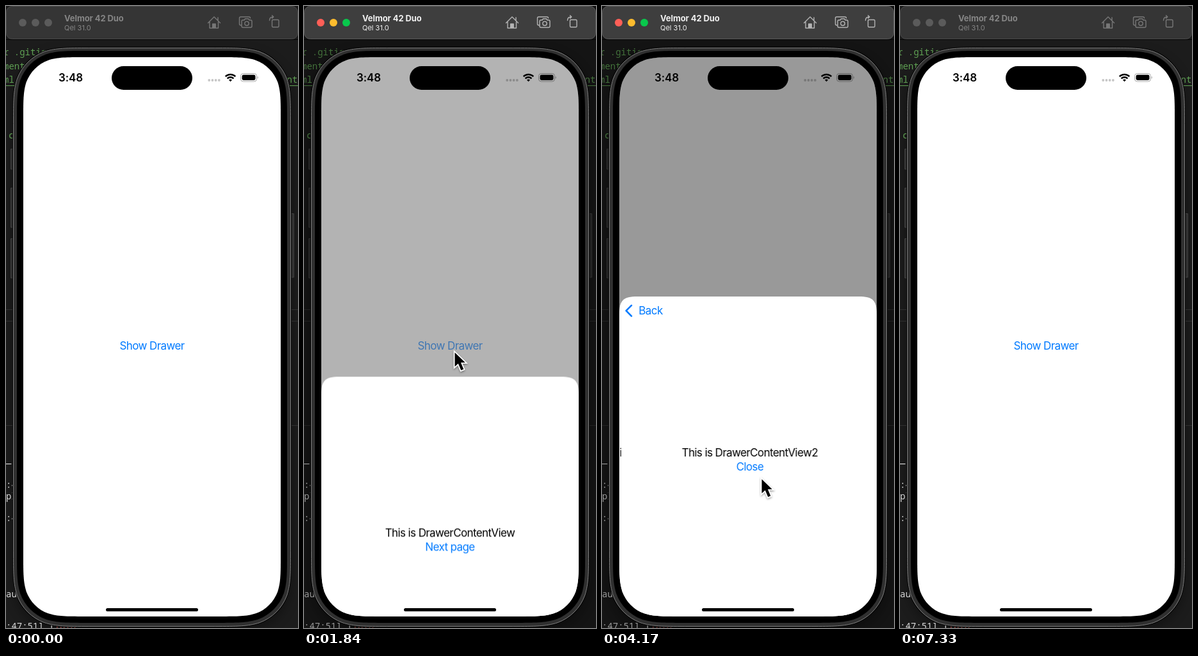
Write an HTML page that moves like this. It is 456 by 972 pixels and loops after 7.37 s.

```html
<!DOCTYPE html>
<html lang="en">
<head>
<meta charset="utf-8">
<title>Drawer demo</title>
<style>
html, body { margin: 0; width: 100%; height: 100%; overflow: hidden; background: #1c1c1c; }
svg { display: block; width: 456px; height: 972px; }
text { font-family: Inter, Roboto, sans-serif; }
.code text { font: 14px "Noto Sans Mono", "DejaVu Sans Mono", monospace; white-space: pre; }
.green { fill: #5fa053; }
.log { fill: #dadada; }
.ui { font-size: 17px; letter-spacing: -.6px; text-anchor: middle; }
.link { fill: #007aff; }
.icon { fill: none; stroke: currentColor; stroke-width: 1.4; stroke-linejoin: round; stroke-linecap: round; }

.anim { animation: 7.37s linear infinite; }
.active { animation-name: active; animation-timing-function: step-end; }
.idle { animation-name: idle; animation-timing-function: step-end; }
.drawer { animation-name: drawer; }
.dim { animation-name: dim; }
.tapShow { animation-name: tapShow; }
.tapNext { animation-name: tapNext; }
.tapClose { animation-name: tapClose; }
.page1 { animation-name: page1; }
.page2 { animation-name: page2; }
.back { animation-name: back; }
.cursor { animation-name: cursor; }

@keyframes active { 0%, 99.457% { opacity: 0 } 15.197% { opacity: 1 } 100% { opacity: 0 } }
@keyframes idle { 0%, 99.457% { opacity: 1 } 15.197% { opacity: 0 } 100% { opacity: 1 } }
@keyframes drawer {
  0% { transform: translateY(500px) }
  22.32% { transform: translateY(500px); animation-timing-function: ease-in-out }
  26.391% { transform: none }
  68.548% { transform: none; animation-timing-function: ease-in-out }
  72.619%, 100% { transform: translateY(500px) }
}
@keyframes dim {
  0% { opacity: 0 }
  22.32% { opacity: 0; animation-timing-function: ease-in-out }
  26.391% { opacity: .4 }
  68.548% { opacity: .4; animation-timing-function: ease-in-out }
  72.619%, 100% { opacity: 0 }
}
@keyframes tapShow { 0%, 22.319% { opacity: 1 } 22.32% { opacity: .2 } 27%, 100% { opacity: 1 } }
@keyframes tapNext { 0%, 51.22% { opacity: 1 } 51.221% { opacity: .2 } 56%, 100% { opacity: 1 } }
@keyframes tapClose { 0%, 68.547% { opacity: 1 } 68.548% { opacity: .2 } 73.2%, 100% { opacity: 1 } }
/* critically damped spring push */
@keyframes page1 {
  0% { transform: none }
  51.221% {
    transform: none;
    animation-timing-function: linear(0, .102 5%, .294 10%, .481 15%, .637 20%, .834 30%, .929 40%, .971 50%, .993 66%, 1);
  }
  59.362%, 73.3% { transform: translateX(-120px) }
  73.301%, 100% { transform: none }
}
@keyframes page2 {
  0% { transform: translateX(402px) }
  51.221% {
    transform: translateX(402px);
    animation-timing-function: linear(0, .102 5%, .294 10%, .481 15%, .637 20%, .834 30%, .929 40%, .971 50%, .993 66%, 1);
  }
  59.362%, 73.3% { transform: none }
  73.301%, 100% { transform: translateX(402px) }
}
@keyframes back { 0%, 51.8% { opacity: 0 } 55.5%, 73.3% { opacity: 1 } 73.301%, 100% { opacity: 0 } }
@keyframes cursor {
  0%, 2% { transform: translate(23px, 976px) }
  4.1% { transform: translate(62px, 832px) }
  6.8% { transform: translate(158px, 632px) }
  9.5% { transform: translate(217px, 547px) }
  11.669%, 16.5% { transform: translate(227px, 534px) }
  21%, 30.1% { transform: translate(234px, 538px) }
  31.8% { transform: translate(244px, 502px) }
  33.4% { transform: translate(238px, 452px) }
  35.007%, 40.6% { transform: translate(226px, 433px) }
  42.5% { transform: translate(236px, 585px) }
  44.6% { transform: translate(243px, 790px) }
  46.2% { transform: translate(244px, 752px) }
  47.762%, 52% { transform: translate(244px, 727px) }
  56%, 57% { transform: translate(248px, 736px) }
  61.2% { transform: translate(246px, 728px) }
  63.5%, 75.4% { transform: translate(240px, 725px) }
  76.5% { transform: translate(186px, 758px) }
  78.4%, 100% { transform: translate(-32px, 893px) }
}
</style>
</head>
<body>
<svg viewBox="0 0 456 972">
  <defs>
    <filter id="soft" x="-20%" y="-20%" width="140%" height="140%"><feGaussianBlur stdDeviation="9"/></filter>
    <filter id="drop" x="-50%" y="-50%" width="200%" height="200%">
      <feDropShadow dx="0" dy="1.5" stdDeviation="1.5" flood-opacity=".4"/>
    </filter>
    <clipPath id="screen"><path data-box="27 80 402 874 62"/></clipPath>
    <clipPath id="sheet"><path d="M27 482C27 460 33 454 55 454H401C423 454 429 460 429 482V960H27Z"/></clipPath>
    <g id="icons" class="icon">
      <path d="M315.5 26.5 325 17l9.5 9.5M318 25v9.5h13.500V25M331 22.500V18"/>
      <path d="M322.600 34v-6h4.600v6z" fill="currentColor"/>
      <path d="M367.500 30h-1a2 2 0 0 1-2-2V19a2 2 0 0 1 2-2h13a2 2 0 0 1 2 2"/>
      <path d="M370 22h2l1.500-2h5l1.500 2h2a2 2 0 0 1 2 2v7.500a2 2 0 0 1-2 2H370a2 2 0 0 1-2-2V24a2 2 0 0 1 2-2Z"/>
      <circle cx="376" cy="27.300" r="3.200"/>
      <rect x="415.500" y="21.500" width="10.500" height="11.500" rx="1.500"/>
      <path d="M411.500 22.500c0-4 2-5.500 6-5.500M415.500 14.800l2.300 2.200-2.300 2.300"/>
    </g>
    <g id="title">
      <text x="91" y="24" font-size="13" font-weight="700" letter-spacing="-.1">Velmor 42 Duo</text>
      <text x="91" y="38" font-size="11">Qel 31.0</text>
    </g>
  </defs>

  <rect width="456" height="972" fill="#1c1c1c"/>
  <path data-box="11 72 434 905 77" filter="url(#soft)" opacity=".35"/>
  <g class="code">
    <g class="green">
      <text x="-4" y="77">r .gitignore</text>
      <text x="-4" y="99">ment</text>
      <text x="-4" y="120">ml</text>
      <text x="438.500" y="120">nt</text>
      <text x="4" y="207">c</text>
      <path d="M0 124.500H14M440 124.500H456" stroke="#5fa053"/>
    </g>
    <g fill="#2d2d2d" stroke="#414141">
      <path d="M20 223.500H7.500V255H20M20 284.500H7.500V346H20M20 363.500H7.500V425H20M436 324.500H449.500V424H436"/>
    </g>
    <path d="M0 474.500H456M0 492.500H456M0 655.500H456" stroke="#303030"/>
    <g class="log">
      <text x="0" y="720" font-size="13.300">—(</text>
      <text x="0" y="753">:47</text>
      <text x="0" y="771">pl</text>
      <text x="0" y="805">:47</text>
      <text x="0" y="924">au</text>
      <text x="0" y="974">:47:51] [<tspan fill="#9c4a45">info</tspan></text>
    </g>
  </g>
  <rect class="anim active" width="456" height="972" opacity="0" fill-opacity=".3"/>

  <g class="anim idle" color="#777">
    <path d="M0 52V0H456V52Z" fill="#1a1a1a"/>
    <rect x=".5" y=".5" width="455" height="51" rx="9" fill="#353535" stroke="#4b4b4b"/>
    <g fill="#5b5b5b"><circle cx="26" cy="26" r="6"/><circle cx="46" cy="26" r="6"/><circle cx="66" cy="26" r="6"/></g>
    <use href="#title" fill="#858585"/>
    <use href="#icons"/>
  </g>
  <g class="anim active" color="#b4b4b4" opacity="0">
    <path d="M0 52V0H456V52Z" fill="#111"/>
    <rect x=".5" y=".5" width="455" height="51" rx="9" fill="#3e3e3e" stroke="#5a5a5a"/>
    <circle cx="26" cy="26" r="6" fill="#ff5f57"/>
    <circle cx="46" cy="26" r="6" fill="#febc2e"/>
    <circle cx="66" cy="26" r="6" fill="#09c84c"/>
    <use href="#title" fill="#f0f0f0"/>
    <use href="#icons"/>
  </g>
  <path d="M0 52.500H456" stroke="#050505"/>

  <path data-box="11.500 65.500 433 904 77" fill="#303030" stroke="#000" stroke-width="3"/>
  <path data-box="11.500 65.500 433 904 77" fill="#303030" stroke="#818181"/>
  <path data-box="17 70 422 894 72"/>

  <g clip-path="url(#screen)">
    <rect x="27" y="80" width="402" height="874" fill="#fff"/>
    <text x="82" y="118" font-size="17" font-weight="600" letter-spacing="-.1">3:48</text>
    <g fill="#c6c6c6">
      <circle cx="317.200" cy="116" r="1.900"/><circle cx="322.400" cy="116" r="1.900"/>
      <circle cx="327.600" cy="116" r="1.900"/><circle cx="332.800" cy="116" r="1.900"/>
    </g>
    <g fill="none" stroke="#000" stroke-width="2.400">
      <path d="M342.700 110.200a11 11 0 0 1 15.600 0M345.600 113.300a7 7 0 0 1 9.800 0"/>
      <path d="M350.500 118.200l-2.500-2.600a3.600 3.600 0 0 1 5 0Z" fill="#000" stroke="none"/>
    </g>
    <rect x="366.500" y="105.500" width="25" height="12.500" rx="4" fill="none" stroke="#a6a6a6"/>
    <rect x="368.500" y="107.500" width="21" height="8.500" rx="2.400"/>
    <path d="M392.800 109.700c1.400.5 1.400 3.600 0 4.100z" fill="#a6a6a6"/>
    <text class="ui link anim tapShow" x="228" y="537">Show Drawer</text>

    <rect class="anim dim" x="27" y="80" width="402" height="874" opacity="0"/>
    <rect x="165" y="94" width="126" height="37" rx="18.500"/>

    <g class="anim drawer">
      <g clip-path="url(#sheet)">
        <rect x="27" y="454" width="402" height="510" fill="#fff"/>
        <g class="anim page1">
          <text class="ui" x="228" y="704">This is DrawerContentView</text>
          <text class="ui link anim tapNext" x="228" y="726">Next page</text>
        </g>
        <g class="anim page2">
          <rect x="27" y="454" width="402" height="510" fill="#fff"/>
          <text class="ui" x="228" y="704">This is DrawerContentView2</text>
          <text class="ui link anim tapClose" x="228" y="726">Close</text>
        </g>
        <g class="anim back">
          <path d="M46 467.800l-8.300 8.400 8.300 8.400" fill="none" stroke="#007aff" stroke-width="2.600" stroke-linecap="round" stroke-linejoin="round"/>
          <text class="ui link" x="76" y="482">Back</text>
        </g>
      </g>
    </g>
    <rect x="156" y="941" width="144" height="5" rx="2.500"/>
  </g>

  <g class="anim cursor">
    <path d="M1.500 3.500V25.500L6.800 20.700 11.300 31.300 15.300 29.600 10.900 19.300H17.800Z" stroke="#fff" stroke-width="3.400" paint-order="stroke" filter="url(#drop)"/>
  </g>
</svg>
<script>
// Unit corner with continuous curvature, from the left edge to the top edge
const half = [[0, 1.528], [0, 1.088], [0, .868], [.075, .631], [.169, .373]];
const corner = [...half, ...half.map(([x, y]) => [y, x]).reverse()];

function squircle(x, y, w, h, r) {
  const at = (sx, sy) => corner.map(([u, v]) =>
    [sx > 0 ? x + u * r : x + w - u * r, sy > 0 ? y + v * r : y + h - v * r]);
  const parts = [at(1, 1), at(-1, 1).reverse(), at(-1, -1), at(1, -1).reverse()];
  return parts.map(([first, ...rest], i) => `${i ? 'L' : 'M'}${first}C${rest.join(' ')}`).join('') + 'Z';
}
for (const p of document.querySelectorAll('[data-box]'))
  p.setAttribute('d', squircle(...p.dataset.box.split(' ').map(Number)));
</script>
</body>
</html>
```
